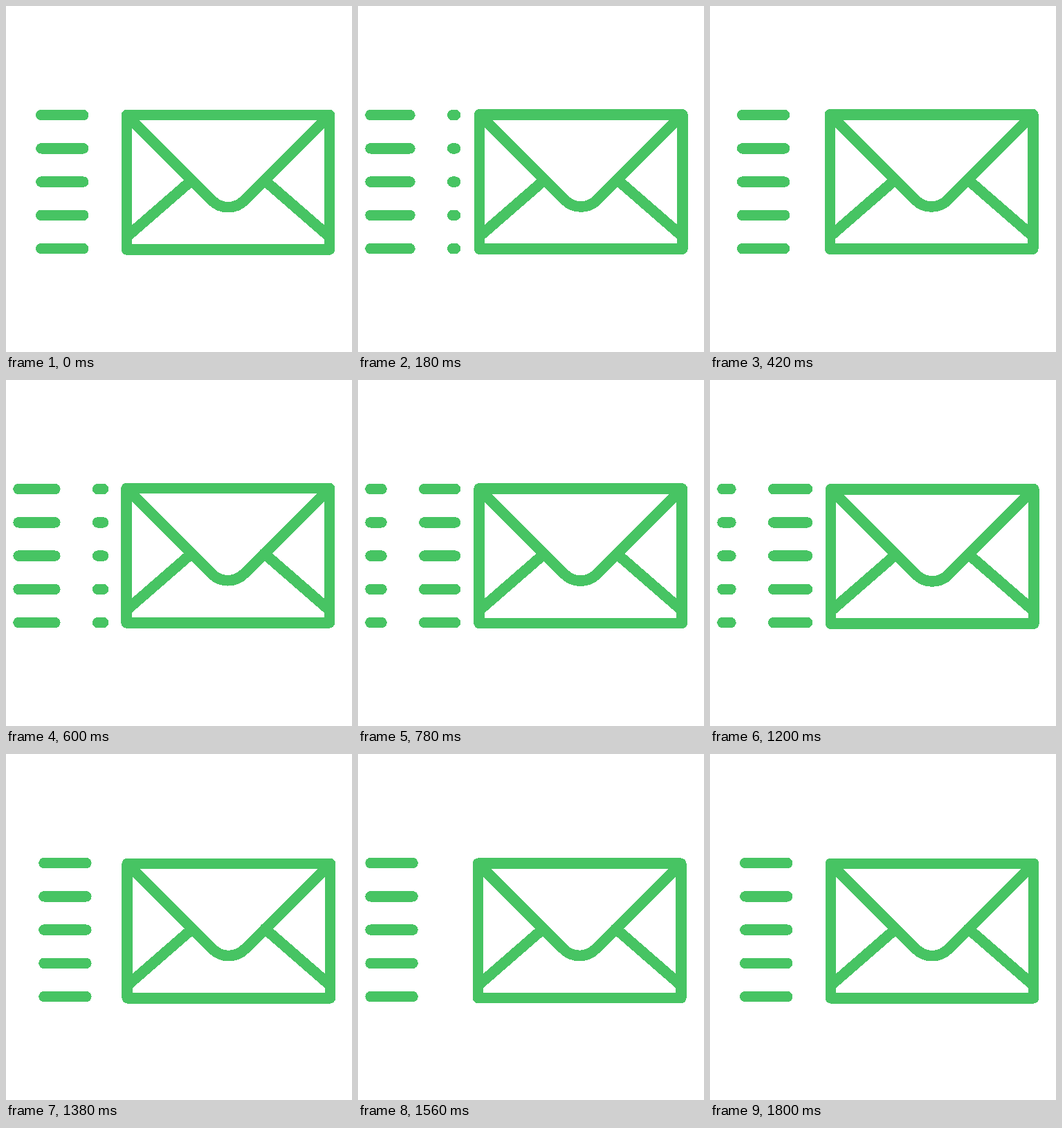
Write an HTML page that moves like this. It is 500x500 px and loops after 1830 ms.

```html
<!DOCTYPE html>
<html lang="en">
<head>
<meta charset="utf-8">
<title>Sending mail</title>
<style>
  html, body { margin: 0; width: 100%; height: 100%; overflow: hidden; background: #fff; }
  svg { display: block; width: 100vw; height: 100vh; }
  g { fill: none; stroke: #47c463; stroke-linecap: round; stroke-linejoin: round; }
</style>
</head>
<body>
<svg viewBox="0 0 500 500" shape-rendering="crispEdges">
  <g id="trails" stroke-width="15.4" stroke-dasharray="61 61.7"></g>
  <g id="envelope" stroke-width="15.6">
    <rect x="174.4" y="157.5" width="293.2" height="194.4"/>
    <path d="M174.4 157.8 L297.7 281.1 A33 33 0 0 0 344.3 281.1 L467.6 157.8"/>
    <path d="M174.4 333.6 L268.6 251.7 M467.6 333.6 L373.4 251.7"/>
  </g>
</svg>
<script>
  const STEP = 30, LOOP = 1830, CYCLE = 1800;
  const DASH_PERIOD = 122.7, DASH_START = 32.8, DASH_CYCLES = 13;

  const trails = document.getElementById('trails');
  const envelope = document.getElementById('envelope');

  for (let i = 0; i < 5; i++) {
    const line = document.createElementNS('http://www.w3.org/2000/svg', 'path');
    line.setAttribute('d', `M18 ${157.6 + 48.25 * i} H140.6`);
    trails.append(line);
  }

  function render(now) {
    const progress = Math.floor((now % LOOP) / STEP) * STEP / CYCLE;
    const wave = cycles => Math.sin(2 * Math.PI * cycles * progress);

    const travel = (DASH_CYCLES * progress) % 1;
    trails.setAttribute('stroke-dashoffset', travel * DASH_PERIOD - DASH_START);

    // The envelope trembles by about a pixel: a slow drift plus a quick shake.
    const dx = 0.95 * wave(3) + 0.34 * wave(2);
    const dy = -0.5 * (wave(0.8) + wave(21.83));
    envelope.setAttribute('transform', `translate(${dx} ${dy})`);
  }

  const start = performance.now();
  function tick() {
    render(performance.now() - start);
    requestAnimationFrame(tick);
  }
  tick();
</script>
</body>
</html>
```
